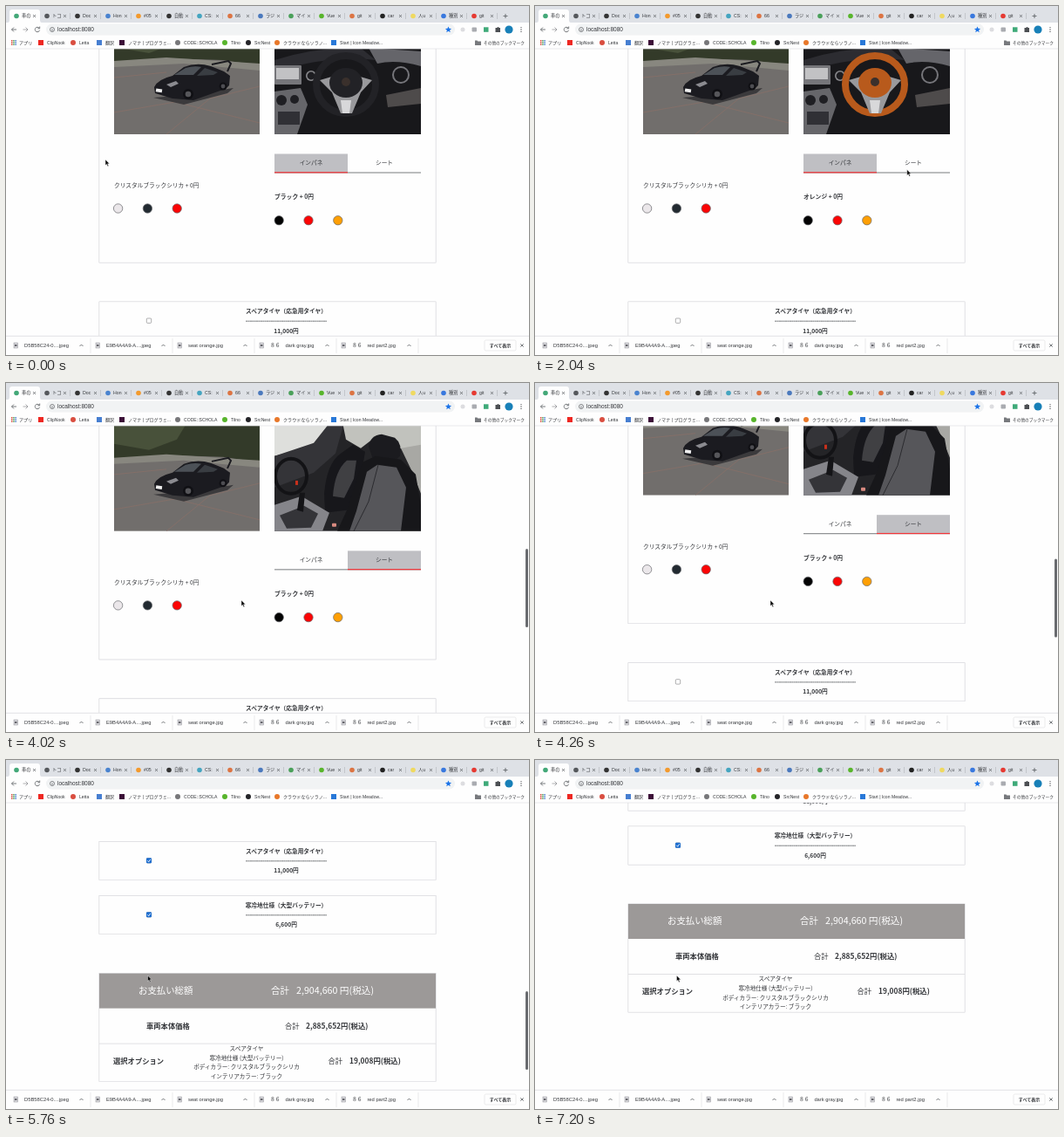
Recreate the animation shown at these times as an HTML page. Size 600 by 400 pixels, loop 7.26 s.

```html
<!DOCTYPE html>
<html lang="ja">
<head>
<meta charset="utf-8">
<style>
html, body { margin: 0; width: 100%; height: 100%; overflow: hidden; background: #fefefe; }
svg { display: block; }
text { font-family: "Liberation Sans", "Noto Sans CJK JP", sans-serif; fill: #35373b; white-space: pre; }
#page text { font-family: "Noto Sans CJK JP", "Noto Sans", sans-serif; }
.b { font-weight: 700; }
.m { text-anchor: middle; }
#page .w { fill: #fff; font-weight: 500; }
.line { fill: none; stroke: #55585c; stroke-width: .8; }
.card { fill: #fefefe; stroke: #e4e4e8; stroke-width: .6; filter: drop-shadow(0 .9px .7px #b9b9c0); }
</style>
</head>
<body>
<svg id="stage" width="600" height="400" viewBox="0 0 600 400"></svg>
<script>
const LOOP = 7260;
const stage = document.getElementById('stage');

const text = (x, y, size, s, cls = '', id = '') =>
  `<text x="${x}" y="${y + size * .36}" font-size="${size}" class="${cls}" id="${id}">${s}</text>`;
const rect = (x, y, w, h, fill, more = '') =>
  `<rect x="${x}" y="${y}" width="${w}" height="${h}" fill="${fill}" ${more}/>`;
const dot = (x, y, r, fill, more = '') => `<circle cx="${x}" cy="${y}" r="${r}" fill="${fill}" ${more}/>`;
const path = (d, fill, more = '') => `<path d="${d}" fill="${fill}" ${more}/>`;
const line = (d, more = '') => `<path d="${d}" class="line" ${more}/>`;
const photo = (x, id, body) =>
  `<svg id="${id}" x="${x}" y="22" width="168" height="125" viewBox="0 0 168 125">${body}</svg>`;

// Photographs, reduced to flat shapes
const car = photo(124, 'car',
  rect(0, 0, 167, 125, '#716e6c') +
  path('M0 0H167V46L125 40 60 38 0 43Z', '#333a29') +
  path('M0 0H84L72 20 40 32 0 25Z', '#48513a') +
  path('M0 41L60 37 167 44V52L80 44 0 48Z', '#88877f') +
  path('M0 60L60 54M0 100L70 88 167 112M60 125L110 84 167 70', 'none', 'stroke="#8c7068" stroke-width=".7"') +
  path('M45 83L80 91 130 78 137 72 84 80Z', '#3b3a3c') +
  path('M46 71Q50 62 67 58L80 48Q95 42 111 47L126 53 133 58 132 69 128 73 119 76 91 86 67 84 47 78Z', '#1b1b20') +
  path('M69 57L82 49Q92 46 100 48L91 57Z', '#4c5157') +
  path('M95 58L104 49 119 54 114 57Z', '#393d42') +
  path('M112 45L131 41 134 44 130 53', 'none', 'stroke="#1b1b20" stroke-width="2"') +
  path('M60 68L71 64 74 67 65 71Z', '#8b8b90') +
  dot(85, 79, 6, '#101014') + dot(85, 79, 3.3, '#56565a') +
  dot(125, 70, 4.5, '#101014') + dot(125, 70, 2.4, '#4d4d52') +
  rect(48, 73, 7, 3.8, '#eeeeee', 'transform="rotate(8 52 75)"'));

const dash = photo(308, 'dash',
  rect(0, 0, 168, 125, '#18181b') +
  path('M108 26L168 30V47Q140 39 118 44Z', '#65656a') +
  path('M0 40Q50 24 100 27L116 40Q60 34 0 54Z', '#2c2c31') +
  rect(0, 46, 31, 22, '#76767a', 'rx="1"') + rect(2, 49, 26, 13, '#c2c2c4') +
  path('M0 76L30 72 38 91 26 125H0Z', '#66666a') +
  dot(8, 86, 6, '#1f1f23') + dot(23, 85, 5, '#1f1f23') + rect(4, 99, 25, 15, '#303035') +
  dot(42, 58, 6, '#88888c') + dot(42, 58, 4.4, '#1d1d21') +
  dot(145, 57, 10, '#76767b') + dot(145, 57, 8, '#18181b') +
  path('M128 80L168 72V90L130 94Z', '#4e4b4b') +
  '<ellipse class="trim" cx="82" cy="68" rx="34" ry="33" fill="none" stroke-width="8"/>' +
  path('M52 63L69 58H95L112 63 99 77 89 101H76L66 77Z', '#99999c') +
  '<ellipse class="trim" cx="82" cy="66" rx="19" ry="17"/>' +
  dot(82, 65, 5, '#3a302c') + path('M76 86H88L86 101H78Z', '#d8d8da'));

const seat = photo(308, 'seat',
  rect(0, 0, 168, 125, '#242427') +
  path('M0 0H67L47 25 25 33 0 39Z', '#dedfdc') +
  path('M78 0H168V33L142 30 130 20H112L99 30 82 20Z', '#c1c2bd') +
  path('M145 30L168 26V82L158 57Z', '#a8a8a4') +
  path('M0 39L45 24 64 0H80L70 36 45 58 0 75Z', '#343438') +
  '<ellipse cx="19" cy="62" rx="18" ry="20" fill="none" stroke="#131316" stroke-width="4"/>' +
  path('M57 82Q60 47 76 36L90 26 104 34 99 65 83 101 58 104Z', '#17171b') +
  path('M67 85Q69 56 83 44L94 44 91 65 80 87Z', '', 'class="trim" opacity=".65"') +
  path('M0 95L31 85 63 104 55 125H0Z', '#85858a') +
  path('M6 107L34 96 50 105 42 121 14 122Z', '#343438') +
  path('M26 101L29 81 35 81 33 103Z', '#141417') +
  path('M108 28Q110 15 123 14L138 18Q147 25 144 39L136 46 113 43Z', '#1b1b1f') +
  path('M101 46L116 39 145 43 162 60 168 95V125H72L83 101Z', '#17171a') +
  path('M106 57L118 49 140 52 151 75 145 125H86L94 102Z', '', 'class="trim"') +
  path('M119 49L108 91 91 125', 'none', 'stroke="#2b2b2f"') +
  rect(24, 67, 3, 5, '#c8301c') + rect(66, 116, 5, 4, '#d88a80', 'rx="1"'));

const swatch = (x, y, fill) => dot(x, y, 5.2, fill, 'stroke="#66686c" stroke-width=".7"');
const row = (x, y, colors) => colors.map((c, i) => swatch(x + i * 33.8, y, c)).join('');

const option = (y, name, price, id) =>
  rect(107, y, 386, 44, '', 'class="card"') +
  text(321.5, y + 11, 6.7, name, 'b m') +
  line(`M275 ${y + 22.2}H368`, 'stroke-dasharray="2.2 .2"') +
  text(321.5, y + 33.3, 6.7, price, 'b m') +
  rect(161.3, y + 19, 5.4, 5.4, '#fff', 'rx="1" stroke="#77777a" stroke-width=".6"') +
  `<g id="${id}">${rect(161, y + 18.7, 6, 6, '#1f6fd0', 'rx="1"')}` +
  path(`M162.3 ${y + 21.7}l1.3 1.5 2.3-3`, 'none', 'stroke="#fff" stroke-width=".9"') + '</g>';

const page = `<g id="page">` +
  rect(107, 0, 386, 294, '', 'class="card"') + car + dash + seat +
  rect(308, 169.5, 84, 21, '#bfbfc3', 'id="tab"') +
  line('M308 191H476') + rect(308, 190.2, 84, 1.2, '#f4363a', 'id="tabLine"') +
  text(350, 180, 6.7, 'インパネ', 'm') + text(434, 180, 6.7, 'シート', 'm') +
  text(124, 205.5, 6.7, 'クリスタルブラックシリカ + 0円') +
  text(308, 219, 6.8, '', 'b', 'trimName') +
  row(128.6, 232, ['#ebe7ea', '#222a31', '#fb0505']) +
  row(313.2, 245.7, ['#030303', '#fb0505', '#ff9f05']) +
  option(339, 'スペアタイヤ（応急用タイヤ）', '11,000円', 'tire') +
  option(401, '寒冷地仕様（大型バッテリー）', '6,600円', 'battery') +
  rect(107, 490, 386, 124, '', 'class="card"') + rect(107, 490, 386, 40, '#9c9998') +
  text(152, 509.5, 10.4, 'お支払い総額', 'w') + text(304, 509.5, 10.4, '合計', 'w') +
  text(333, 509.5, 10.7, '', 'w', 'total') +
  text(161, 550, 8.3, '車両本体価格', 'b') + text(320, 550, 8.3, '合計') +
  text(344, 550, 8.4, '2,885,652円(税込)', 'b') +
  line('M107 570.5H493', 'style="stroke:#d8d8dc"') +
  text(123, 590, 8.3, '選択オプション', 'b') + text(369.5, 590, 8.3, '合計') +
  text(394, 590, 8.4, '19,008円(税込)', 'b') +
  ['スペアタイヤ', '寒冷地仕様 (大型バッテリー)', 'ボディカラー: クリスタルブラックシリカ', 'インテリアカラー: ブラック']
    .map((s, i) => text(276, 576 + i * 10.6, 6.6, s, 'm')).join('') + '</g>';

// Browser frame
const cross = (x, y, r = 1.4) => line(`M${x - r} ${y - r}l${2 * r} ${2 * r}m0 ${-2 * r}l${-2 * r} ${2 * r}`);
const tabs = [
  ['車の', '#43a878'], ['トコ', '#55585c'], ['Doc', '#333'], ['Hon', '#4a83cf'], ['#05', '#f39a2d'], ['自動', '#333'],
  ['CS:', '#45a5c0'], ['66', '#dc7443'], ['ラジ', '#4b79bd'], ['マイ', '#4aa05a'], ['Vue', '#58b52c'], ['git', '#dc7443'],
  ['car', '#222'], ['人u', '#efd960'], ['種別', '#3978de'], ['git', '#e63a32']
].map(([s, c], i) => {
  const x = 12 + i * 35;
  return dot(x, 11.5, 2.8, c) + text(x + 6, 11.5, 5.2, s) + cross(x + 20.5, 11.5) +
    (i ? line(`M${x + 26.5} 8v7`, 'style="stroke:#a9abb0;stroke-width:.5"') : '');
}).join('');

const bookmarks = [
  [40, 'ClipNook', '#ee2822'], [77, 'Letta', '#d94e40'], [107, '翻訳', '#477fd1'], [133, 'ノマナ | プログラミ...', '#3c1038'],
  [197, 'CODE::SCHOLA', '#77777a'], [251, 'Tilno', '#58b52c'], [278, 'SrcNest', '#242428'],
  [311, 'クラウドならソラノ...', '#e8782a'], [376, 'Start | Icon Meadow...', '#2878d8']
].map(([x, s, c], i) =>
  (i % 3 == 1 || i > 4 && i < 7 ? dot(x, 42, 3, c) : rect(x - 3, 39, 6, 6, c)) + text(x + 7, 42, 5.1, s)).join('');

const apps = Array.from({ length: 9 }, (_, i) =>
  rect(6 + i % 3 * 2.2, 39 + (i / 3 | 0) * 2.2, 1.5, 1.5, ['#db4d3e', '#4d9b55', '#4b7ed0'][i % 3])).join('');

const downloads = ['D5B58C24-0....jpeg', 'E9B4A4A9-A....jpeg', 'seat orange.jpg', '８６　dark gray.jpg', '８６　red part2.jpg']
  .map((s, i) => {
    const x = 11 + i * 94;
    return rect(x - 2, 386, 4.5, 6, '#d5d5d9', 'stroke="#909096" stroke-width=".5"') +
      rect(x - 1, 388, 2.5, 2, '#66666c') + text(x + 10, 389, 5.8, s) +
      line(`M${x + 73.5} 390l2-2 2 2`) + line(`M${x + 86} 381v17`, 'style="stroke:#dddde0;stroke-width:.6"');
  }).join('');

const frame =
  rect(0, 0, 600, 49, '#fefefe') + rect(0, 0, 600, 19, '#dee1e6') +
  path('M2 19Q4 19 4 16V7Q4 4 7 4H36Q39 4 39 7V16Q39 19 41 19Z', '#fefefe') + tabs +
  line('M570.5 11.5h5m-2.5-2.5v5') +
  line('M12 27H6.5m2.5-2.5L6.5 27 9 29.5') + line('M19.5 27H25m-2.5-2.5L25 27 22.5 29.5', 'opacity=".6"') +
  line('M38 25.2a2.7 2.7 0 1 0 .6 2.5M38.7 23.5v2.3h-2.3') +
  rect(46, 20.5, 469, 13, '#f1f3f4', 'rx="6.5"') +
  dot(53, 27, 2.5, 'none', 'stroke="#55585c" stroke-width=".7"') + rect(52.6, 26.5, .8, 2, '#55585c') +
  text(59, 27, 6.5, 'localhost:8080') +
  path('M507.5 23.4l1 2.4 2.6.2-2 1.7.6 2.5-2.2-1.4-2.2 1.4.6-2.5-2-1.7 2.6-.2Z', '#1a73e8') +
  dot(524, 27, 2.5, '#dddde0') + rect(534.5, 24.5, 5.5, 5, '#a9abb0', 'rx="1"') + rect(548, 24.3, 5.5, 5.5, '#3faa79') +
  path('M561.5 25h2a1 1 0 0 1 2 0h1.5v5h-5.5z', '#4c4f53') + dot(577, 27, 4.6, '#1880b8') +
  [24.6, 27, 29.4].map(y => dot(591, y, .65, '#4c4f53')).join('') +
  apps + text(15, 42, 5.1, 'アプリ') + bookmarks +
  path('M538 39.5h2.5l.8 1H545v4.5h-7z', '#77797d') + text(548, 42, 4.7, 'その他のブックマーク') +
  line('M0 49H600', 'style="stroke:#dedee2;stroke-width:.7"') +
  rect(0, 378, 600, 22, '#fefefe') + line('M0 378.3H600', 'style="stroke:#d8d8dc;stroke-width:.7"') + downloads +
  rect(549, 383, 36, 12, '#fefefe', 'rx="1.5" stroke="#dddde0" stroke-width=".6"') +
  text(567, 389, 5, 'すべて表示', 'b m') + cross(592, 389, 1.7);

stage.innerHTML = rect(0, 0, 600, 400, '#fefefe') + page +
  rect(596, 0, 3, 90, '#686a6e', 'rx="1.5" id="bar"') + frame +
  path('M0 0v6.6l1.5-1.4 1.1 2.5 1.1-.4-1.1-2.5h2.1z', '#080808', 'id="cursor" stroke="#fff" stroke-width=".4"');

// Motion: each key is [time, value, ...]
const smooth = p => p * p * (3 - 2 * p);
function track(keys, t, ease = p => p) {
  const i = keys.findIndex(k => k[0] > t);
  if (i < 0) return keys.at(-1).slice(1);
  if (!i) return keys[0].slice(1);
  const a = keys[i - 1], b = keys[i], p = ease((t - a[0]) / (b[0] - a[0]));
  return a.slice(1).map((v, j) => v + (b[j + 1] - v) * p);
}
const lastKey = (keys, t) => keys.findLast(k => k[0] <= t)[1];

// The seat photograph is taller, so the page grows by 25 when it appears.
const SEAT_AT = 2220, TIRE_AT = 5100, BATTERY_AT = 5520;
const scrollKeys = [[3960, -25], [4020, -23], [4140, -7], [4260, 18], [4440, 72], [4560, 103], [4680, 123], [4800, 133],
  [5220, 133], [5400, 176], [5580, 176], [5700, 222], [5820, 268], [5940, 300], [6060, 317], [6180, 323], [6300, 325]];
const barKeys = [[3930, 0], [3960, 1], [4860, 1], [5100, 0], [5200, 0], [5230, 1], [6600, 1], [6900, 0]];
const cursorKeys = [[0, 114, 176], [660, 346, 245], [960, 346, 245], [1260, 381, 245], [1560, 381, 245],
  [2160, 432, 181], [2340, 432, 181], [2700, 381, 270], [2880, 381, 270], [3120, 346, 270],
  [3300, 346, 270], [3540, 313, 270], [3660, 313, 270], [3900, 270, 249], [4740, 270, 249], [5040, 162.5, 227],
  [5220, 162.5, 227], [5400, 162.5, 247]];
const trimKeys = [[0, 0], [780, 1], [1380, 2], [SEAT_AT, 0], [2760, 2], [3180, 1], [3600, 0]];
const trims = [['ブラック', '#222226', '#56565a'], ['レッド', '#a8201c', '#8e2a28'], ['オレンジ', '#b85a1c', '#ad6132']];

const $ = id => document.getElementById(id);
const show = (id, on) => $(id).setAttribute('visibility', on ? 'visible' : 'hidden');

function draw(t) {
  const seated = t >= SEAT_AT;
  const scroll = seated ? track(scrollKeys, t)[0] : 0;
  const [name, wheelColor, seatColor] = trims[lastKey(trimKeys, t)];
  $('page').setAttribute('transform', `translate(0 ${-scroll})`);
  show('dash', !seated);
  show('seat', seated);
  for (const id of ['tab', 'tabLine']) $(id).setAttribute('x', seated ? 392 : 308);
  $('trimName').textContent = name + ' + 0円';
  document.querySelectorAll('#dash .trim').forEach((e, i) => e.setAttribute(i ? 'fill' : 'stroke', wheelColor));
  document.querySelectorAll('#seat .trim').forEach(e => e.setAttribute('fill', seatColor));
  show('tire', t >= TIRE_AT);
  show('battery', t >= BATTERY_AT);
  const total = 2885652 + (t >= TIRE_AT ? 11880 : 0) + (t >= BATTERY_AT ? 7128 : 0);
  $('total').textContent = total.toLocaleString('en-US') + ' 円(税込)';
  $('bar').setAttribute('y', 196.3 + scroll * .28);
  $('bar').setAttribute('opacity', track(barKeys, t)[0]);
  $('cursor').setAttribute('transform', `translate(${track(cursorKeys, t, smooth)})`);
}

const start = performance.now();
function tick() {
  draw((performance.now() - start) % LOOP);
  requestAnimationFrame(tick);
}
tick();
</script>
</body>
</html>
```
